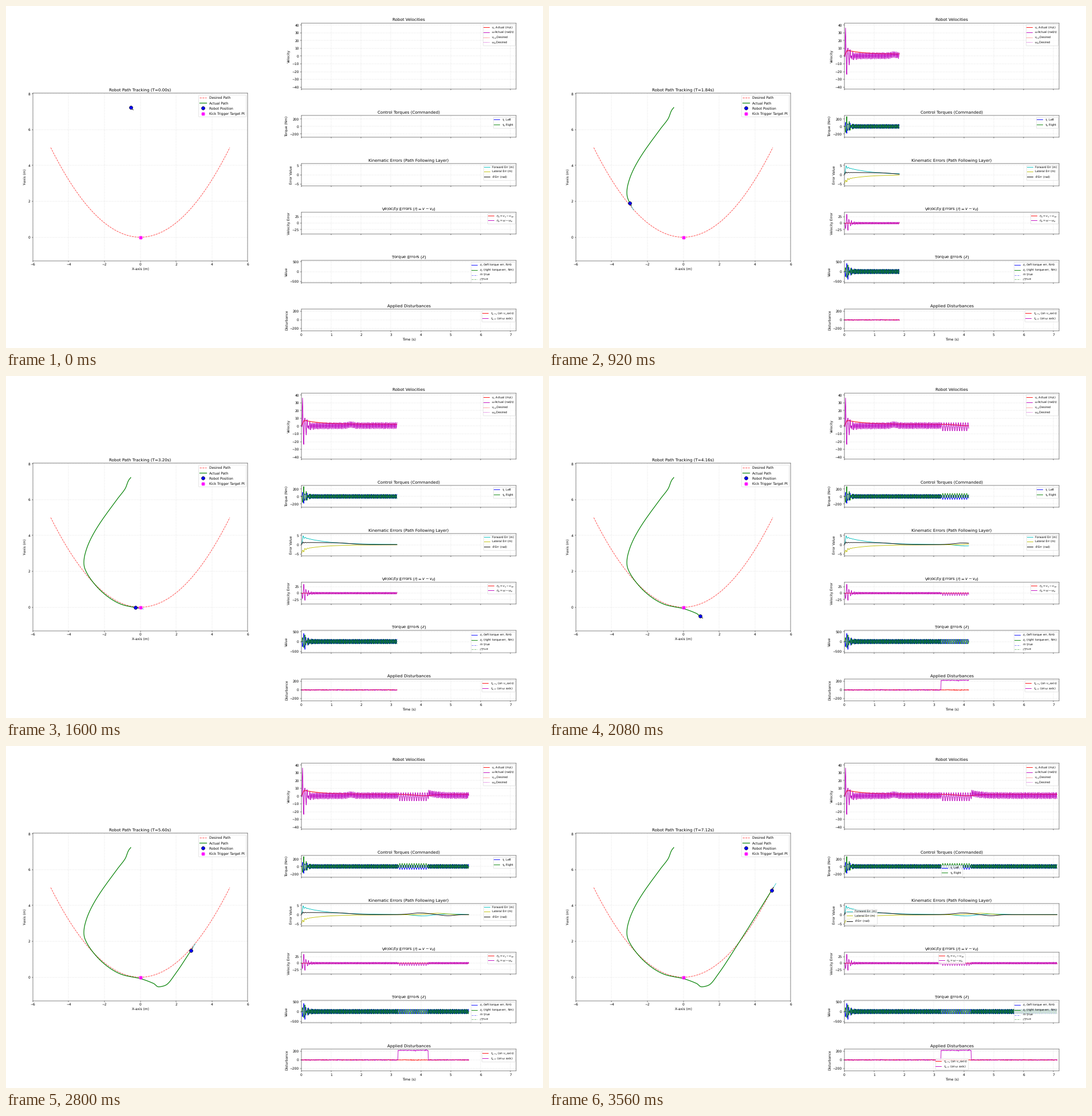
Write a matplotlib script that moves like this. It is 938x597 px and loops after 3600 ms.

```python
import numpy as np
import matplotlib.pyplot as plt
from matplotlib.animation import FuncAnimation

DPI = 42.64
FRAMES = 90
DT = 0.01
STEP = 8                        # samples per frame
KICK_ON, KICK_OFF = 3.23, 4.25

plt.rcParams["text.hinting"] = "none"
rng = np.random.default_rng(4)
t = np.arange(FRAMES * STEP) * DT
kick = (t > KICK_ON) & (t < KICK_OFF)


def hermite(knots, vals):
    """Cubic curve through the knots, sampled at every time step."""
    knots, vals = np.array(knots), np.array(vals)
    slope = np.gradient(vals, knots)
    i = np.clip(np.searchsorted(knots, t, "right") - 1, 0, len(knots) - 2)
    h = knots[i + 1] - knots[i]
    u = np.minimum((t - knots[i]) / h, 1)
    return ((2*u**3 - 3*u**2 + 1) * vals[i] + (u**3 - 2*u**2 + u) * h * slope[i]
            + (3*u**2 - 2*u**3) * vals[i + 1] + (u**3 - u**2) * h * slope[i + 1])


def rise(span):
    return np.minimum(t / span, 1)


def bump(centre, width):
    return np.exp(-((t - centre) / width) ** 2)


def burst(peak):
    """Short start-up ringing with its largest swing at the given time."""
    return (rise(0.03) ** 3 * np.exp(-12 * abs(t - peak))
            * np.cos(2 * np.pi * (t - peak) / 0.08))


# Robot path: time, x, y
way = [(0, -.53, 7.24), (.1, -.69, 7.0), (.16, -.83, 6.64), (.25, -1.22, 6.12),
       (.72, -2.48, 4.33), (1.22, -3.07, 3.02), (1.47, -3.15, 2.51), (1.84, -2.99, 1.92),
       (2.33, -2.23, .94), (2.87, -1.11, .18), (3.32, .01, -.08), (3.78, .68, -.32),
       (4.4, 1.13, -.53), (4.62, 1.45, -.43), (5.03, 2.0, .24), (5.6, 2.83, 1.49),
       (7.12, 4.94, 4.85)]
wt, wx, wy = zip(*way)
px, py = hermite(wt, wx), hermite(wt, wy)
heading = np.arctan2(np.gradient(py), np.gradient(px))
heading[:STEP // 2] = -np.pi / 4

# Chattering signal, slower while the kick lasts
chatter = np.sin(np.cumsum(2 * np.pi * DT / np.where(kick, 0.08, 0.047))) * rise(0.15)
recover = np.where(t > KICK_OFF, np.exp(-3.5 * (t - KICK_OFF)), 0)

v = rise(0.1) * (2.3 + 5.9 * np.exp(-1.7 * t)) - 1.9 * bump(4.1, 0.45)
w_mid = 0.6 - 0.9 * np.exp(-1.5 * t) + 1.4 * bump(1.66, 0.12) - 1.5 * kick + 3.4 * recover
w = w_mid + np.where(kick, 5.6, 4.2) * chatter + 36 * burst(0.04)
v_d = v + 0.15 + 0.5 * np.exp(-3 * t)
w_d = w_mid + 2 * chatter + 15 * burst(0.04)

tau_l = -24 * kick + 58 * chatter - 170 * burst(0.08)
tau_r = 24 * kick - 58 * chatter + 250 * burst(0.08)

e_fwd = (4.3 * rise(0.06) * np.exp(-1.3 * t) + 0.7 * burst(0.06) + 0.15
         - 0.8 * bump(4.05, 0.4) + 0.3 * bump(4.95, 0.4))
e_lat = (-2.6 * np.exp(-1.5 * t) - 2 * np.exp(-15 * t) - 0.9 * burst(0.08)
         + 0.85 * bump(4.55, 0.45))
e_th = (1.1 * rise(0.05) / (1 + np.exp(5 * (t - 1.62))) + 0.3 * burst(0.05) + 0.1
        + 0.9 * bump(3.98, 0.42) - 0.6 * bump(4.9, 0.3))

eta1 = 0.4 * chatter - 2 * burst(0.04)
eta2 = (-3.2 * kick + np.where(kick, 5.8, 4.2 + 4 * np.exp(-5 * t)) * chatter
        + 36 * burst(0.08))
z_swing = (120 + 60 * np.exp(-6 * t)) * chatter
z1 = z_swing + 450 * burst(0.08)
z2 = -z_swing - 350 * burst(0.08)
d_v = rng.normal(0, 4, len(t))
d_w = rng.normal(0, 4.5, len(t)) + 222 * kick

# Layout
fig = plt.figure(figsize=(938.000001 / DPI, 597.000001 / DPI), dpi=DPI)
gs = fig.add_gridspec(6, 2, height_ratios=[3, 1, 1, 1, 1, 1], hspace=0.9, wspace=0.25,
                      left=0.05, right=0.95, top=0.95, bottom=0.05)

ax = fig.add_subplot(gs[:, 0])
ax.set_aspect("equal")
ax.set(xlim=(-6, 6), ylim=(-1.31, 8.03), xticks=range(-6, 7, 2), yticks=range(0, 9, 2),
       xlabel="X-axis (m)", ylabel="Y-axis (m)")
ax.grid(True, linestyle=":", alpha=0.7)
xs = np.linspace(-5, 5, 200)
ax.plot(xs, 0.2 * xs**2, "r--", alpha=0.75, label="Desired Path")
trail, = ax.plot([], [], "g-", lw=2, label="Actual Path")
robot, = ax.plot([], [], "bo", ms=10, mec="black", label="Robot Position", zorder=5)
ax.plot([0], [0], "X", color="magenta", ms=10, ls="none", label="Kick Trigger Target Pt",
        zorder=6)
speed_line, = ax.plot([], [], "c-", lw=1.5, alpha=0.8, zorder=3)
nose, = ax.plot([], [], "k-", lw=1.5, zorder=4)
title = ax.set_title("")
ax.legend(loc="upper right", labelspacing=0.55)

curves = []
# Formula labels come out taller at this size, so their rows sit closer
TIGHT = dict(labelspacing=0.03, borderpad=0.17)


def panel(row, name, ylabel, limit, ticks, series, spacing=TIGHT):
    """One time chart; series holds (data, format, label)."""
    p = fig.add_subplot(gs[row, 1])
    p.set(xlim=(0, 7.19), ylim=(-limit, limit), xticks=range(8), yticks=ticks,
          title=name, ylabel=ylabel)
    p.grid(True, linestyle=":", alpha=0.7)
    p.tick_params(labelbottom=row == 5)
    for data, fmt, label in series:
        line, = p.plot([], [], fmt, label=label, alpha=0.5 if "--" in fmt else 1)
        curves.append((line, data))
    return p, p.legend(loc="upper right", fontsize="small", **spacing)


panel(0, "Robot Velocities", "Velocity", 42.5, range(-40, 41, 10), [
    (v, "r-", r"$v_1$ Actual (m/s)"),
    (w, "m-", r"$\omega$ Actual (rad/s)"),
    (v_d, "r:", r"$v_{1d}$ Desired"),
    (w_d, "m:", r"$\omega_d$ Desired")])
_, leg_tau = panel(1, "Control Torques (Commanded)", "Torque (Nm)", 297, [-200, 0, 200], [
    (tau_l, "b-", r"$\tau_L$ Left"),
    (tau_r, "g-", r"$\tau_R$ Right")])
_, leg_kin = panel(2, "Kinematic Errors (Path Following Layer)", "Error Value", 5.9,
                   [-5, 0, 5], [
    (e_fwd, "c-", "Forward Err (m)"),
    (e_lat, "y-", "Lateral Err (m)"),
    (e_th, "k-", r"$\theta$ Err (rad)")], dict(borderpad=0.3))
_, leg_eta = panel(3, r"Velocity Errors ($\eta = v - v_d$)", "Velocity Error", 42.3,
                   [-25, 0, 25], [
    (eta1, "r-", r"$\eta_1 = v_1 - v_{1d}$"),
    (eta2, "m-", r"$\eta_2 = \omega - \omega_d$")])
panel(4, "Torque Errors ($z$)", "Value", 556, [-500, 0, 500], [
    (z1, "b-", r"$z_1$ (left torque err, Nm)"),
    (z2, "g-", r"$z_2$ (right torque err, Nm)"),
    (np.full(len(t), 10.0), "b--", r"$m$ True"),
    (np.ones(len(t)), "g--", r"$I$ True")])
bottom, leg_dist = panel(5, "Applied Disturbances", "Disturbance", 256, [-200, 0, 200], [
    (d_v, "r-", r"$\tau_{d,v1}$ (on $v_1$ axis)"),
    (d_w, "m-", r"$\tau_{d,\omega}$ (on $\omega$ axis)")])
bottom.set_xlabel("Time (s)")

# Legends that make room for the curves: first frame at the new place
moves = [(leg_tau, 87, "lower center"), (leg_kin, 87, "lower left"),
         (leg_eta, 86, "upper center"), (leg_dist, 84, "lower center")]


def draw(frame):
    n = frame * STEP
    title.set_text(f"Robot Path Tracking (T={t[n]:.2f}s)")
    x, y, a = px[n], py[n], heading[n]
    trail.set_data(px[:n + 1], py[:n + 1])
    robot.set_data([x], [y])
    for line, length in ((nose, 0.19), (speed_line, min(0.45, 0.2 * v[n]))):
        line.set_data([x, x + length * np.cos(a)], [y, y + length * np.sin(a)])
    for line, data in curves:
        line.set_data(t[:n + 1], data[:n + 1])
    for legend, start, place in moves:
        legend.set_loc(place if frame >= start else "upper right")
    return []


anim = FuncAnimation(fig, draw, frames=FRAMES, interval=40, repeat=True, repeat_delay=0)
plt.show()
```
